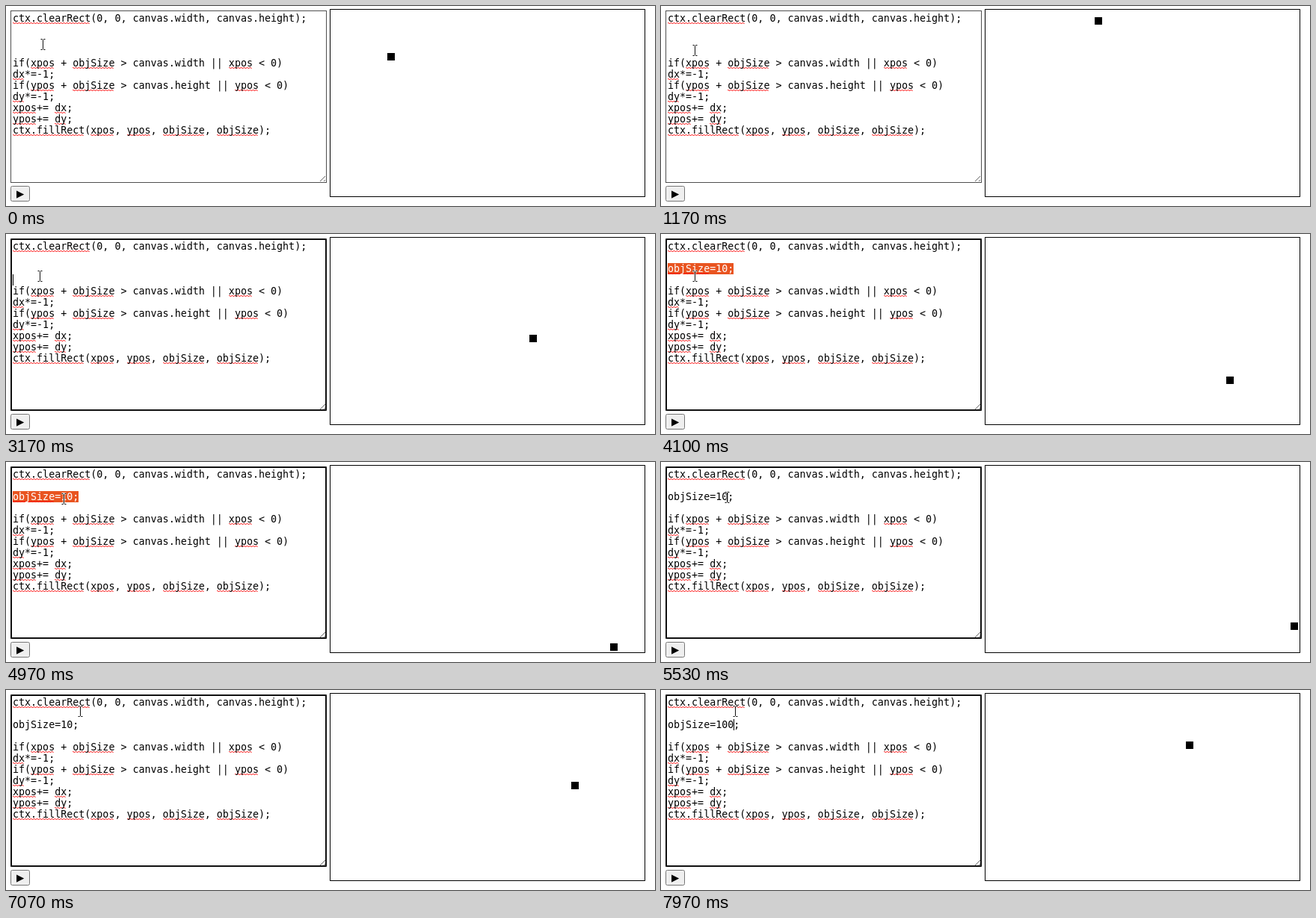
An HTML page for the animation above (8 s loop, 868x268 px).

```html
<!DOCTYPE html>
<html lang="en">
<head>
<meta charset="utf-8">
<title>Bouncing square editor</title>
<style>
html, body { margin: 0; width: 100%; height: 100%; overflow: hidden; background: #fff; }
svg { display: block; }
text { font: 13.3333px "DejaVu Sans Mono", monospace; white-space: pre; }
.wave { fill: none; stroke: #f00; stroke-width: 1; stroke-linejoin: round; }
#play { font-family: "DejaVu Sans", sans-serif; }
</style>
</head>
<body>
<svg width="868" height="268" viewBox="0 0 868 268">
  <defs>
    <clipPath id="inside"><rect x="434" y="5" width="420" height="250"/></clipPath>
    <path id="beam" fill="none" d="M-3 -7 H-1 L0 -6 L1 -7 H3 M0 -6 V6 M-3 7 H-1 L0 6 L1 7 H3"/>
  </defs>
  <rect x="433.5" y="4.5" width="421" height="251" fill="#fff" stroke="#000"/>
  <g clip-path="url(#inside)"><rect id="square" width="10" height="10"/></g>

  <rect x="6.5" y="6.5" width="422" height="230" fill="#fff" stroke="#4f4f4f"/>
  <path d="M420 235 L427 228 M425 235 L427 233" stroke="#666" fill="none"/>
  <rect id="ring" x="7" y="7" width="421" height="229" rx="1.5" fill="none" stroke="#101010" stroke-width="2"/>

  <rect id="selection" x="9" y="39" width="88" height="15" fill="#e95420"/>
  <g id="code"></g>
  <rect id="caret" width="1" height="15"/>

  <rect x="6.5" y="241.5" width="25" height="20" rx="2" fill="#efefef" stroke="#767676"/>
  <text id="play" x="14" y="256">▶</text>

  <g id="mouse">
    <use href="#beam" stroke="#fff" stroke-width="2.6" stroke-opacity=".8"/>
    <use href="#beam" stroke="#111"/>
  </g>
</svg>
<script>
const LOOP = 8000, STEP = 100 / 3, CHAR = 8.027, LEFT = 9, TOP = 9, LINE = 15;
const FOCUS = 3000, UNDO = 4070, CLICK = 5400, TYPE = 7700;
const SPEED = 0.06; // pixels per ms along each axis
const STALLS = [[870, 1170], [5530, 5770]]; // the screen freezes
const $ = id => document.getElementById(id);

const lines = [
  "ctx.clearRect(0, 0, canvas.width, canvas.height);",
  "", "", "",
  "if(xpos + objSize > canvas.width || xpos < 0)",
  "dx*=-1;",
  "if(ypos + objSize > canvas.height || ypos < 0)",
  "dy*=-1;",
  "xpos+= dx;",
  "ypos+= dy;",
  "ctx.fillRect(xpos, ypos, objSize, objSize);"
];

// pointer moves: start, end, dx, dy
const moves = [
  [0, 1400, -4, 9],
  [2830, 3100, 0, -4],
  [4300, 5300, 43, -9],
  [5900, 6570, 11, -19]
];

function add(tag, attrs, text) {
  const el = document.createElementNS("http://www.w3.org/2000/svg", tag);
  for (const k in attrs) el.setAttribute(k, attrs[k]);
  if (text) el.textContent = text;
  return $("code").appendChild(el);
}

function wave(row, col, count) {
  const x = Math.round(LEFT + col * CHAR);
  const end = Math.round(LEFT + (col + count) * CHAR);
  const y = TOP + row * LINE + 14;
  let d = `M${x} ${y}`;
  for (let i = 0; x + i * 2 + .5 < end; i++) d += ` L${x + i * 2 + .5} ${y + (i % 2 ? .5 : -.5)}`;
  return add("path", { class: "wave", d });
}

lines.forEach((line, row) => {
  for (const m of line.matchAll(/ctx\.\w+|[xy]pos|objSize|\bd[xy]\b/g)) wave(row, m.index, m[0].length);
  add("text", { x: LEFT, y: TOP + row * LINE + 12 }, line);
});
const sizeWave = wave(2, 0, 7);
const sizeText = add("text", { x: LEFT, y: TOP + 2 * LINE + 12 });

function pointerAt(t) {
  let x = 49, y = 51;
  for (const [from, to, dx, dy] of moves) {
    const f = Math.min(1, Math.max(0, (t - from) / (to - from)));
    const ease = f * f * (3 - 2 * f);
    x += dx * ease;
    y += dy * ease;
  }
  return [Math.round(x), Math.round(y)];
}

function bounce(v, span) {
  const m = ((v % (2 * span)) + 2 * span) % (2 * span);
  return (m > span ? 2 * span - m : m) - 1;
}

function show(el, on) {
  el.setAttribute("visibility", on ? "visible" : "hidden");
}

function place(el, x, y) {
  el.setAttribute("x", x);
  el.setAttribute("y", y);
}

function render(time) {
  // 30 pictures a second, on times rounded to 10 ms
  let t = Math.round(Math.floor((time + 3.4) / STEP) * STEP / 10) * 10;
  for (const [from, to] of STALLS) if (t > from && t < to) t = from;

  const k = Math.round(t * SPEED);
  place($("square"), 434 + bounce(77 + k, 412), 5 + bounce(59 - k, 242));
  const [x, y] = pointerAt(t);
  $("mouse").setAttribute("transform", `translate(${x + .5} ${y + .5})`);

  const selected = t >= UNDO && t < CLICK;
  show($("ring"), t >= FOCUS);
  show($("selection"), selected);
  show(sizeWave, selected);
  sizeText.textContent = t < UNDO ? "" : t < TYPE ? "objSize=10;" : "objSize=100;";
  sizeText.setAttribute("fill", selected ? "#fff" : "#000");

  const since = t - (t < CLICK ? FOCUS : t < TYPE ? CLICK : TYPE);
  show($("caret"), since >= 0 && !selected && since % 1000 < 500);
  place($("caret"), t < CLICK ? 9 : t < TYPE ? 89 : 97, t < CLICK ? 54 : 39);
}

function tick() {
  render(performance.now() % LOOP);
  requestAnimationFrame(tick);
}
tick();
</script>
</body>
</html>
```
